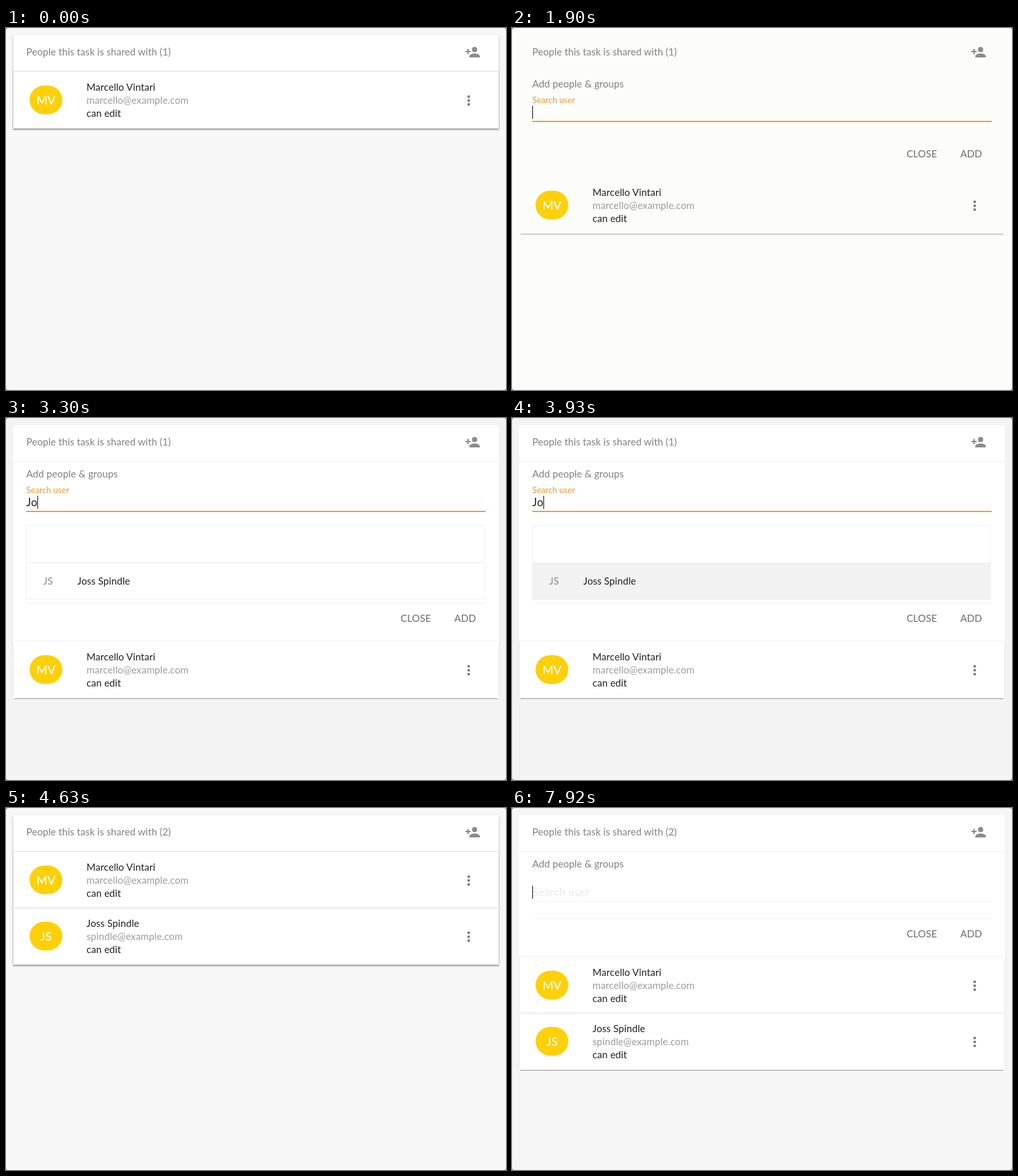
These frames come from a looping animation (764x554 px, 7.99 s). An HTML page:

```html
<!DOCTYPE html>
<html lang="en">
<head>
<meta charset="utf-8">
<title>Task sharing</title>
<style>
html, body { margin: 0; width: 100%; height: 100%; overflow: hidden; background: #555; }
* { box-sizing: border-box; }

.stage {
  --run: 7.99s step-end infinite;
  position: relative; width: 764px; height: 554px; overflow: hidden; border-radius: 3px;
  background: var(--bg); color: #212121;
  font: 15px/20px Lato, Muli, "Open Sans", sans-serif; letter-spacing: .005em; white-space: nowrap;
  animation: tone var(--run);
}
.stage::after { content: ""; position: absolute; inset: 0; border-radius: 3px; box-shadow: inset 0 0 0 1px rgba(0,0,0,.03); }

.card {
  position: absolute; left: 11px; top: 11px; width: 742px; padding-bottom: 1px;
  background: var(--card); box-shadow: var(--shadow);
}
.abs { position: absolute; }
.grey { color: #808080; }

header { position: relative; height: 56px; border-bottom: 1px solid var(--line); }
header .title { left: 20px; top: 15px; }
.count { display: inline-grid; }
.count span { grid-area: 1 / 1; }
.one { animation: one var(--run); }
.two { animation: two var(--run); }
.invite { left: 690px; top: 14px; width: 24px; height: 24px; animation: hover var(--run); }

.panel { position: relative; overflow: hidden; animation: open var(--run); }
.prompt { left: 20px; top: 8px; }
.label {
  left: 20px; top: 52px; font-size: 17px; color: #ebebeb; transform-origin: 0 50%;
  animation: float 7.99s linear infinite;
}
.entry { left: 20px; top: 52px; height: 20px; display: flex; align-items: center; font-size: 17px; letter-spacing: 0; }
.entry span { max-width: 0; overflow: hidden; }
.j { animation: typeJ var(--run); }
.o { animation: typeO var(--run); }
.caret { width: 1px; height: 20px; background: #111; animation: caret var(--run); }
.rule { left: 20px; width: 702px; height: 1px; background: var(--line); }
.base { top: 76px; }
.focus { top: 75px; height: 2px; background: #e9a23b; animation: focus 7.99s linear infinite; }

.results { position: relative; margin: 97px 0 0 20px; width: 701px; height: 0; overflow: hidden; animation: results var(--run); }
.results div { position: relative; height: 56px; border: solid #f0f0f0; border-width: 0 1px 1px; }
.results div:first-child { height: 58px; border-top-width: 1px; }
.results b { position: absolute; left: 25px; top: 17px; font-weight: 400; color: #8a8a8a; }
.results i { position: absolute; left: 77px; top: 17px; font-style: normal; }
.pick { animation: pick var(--run); }

footer { position: relative; height: 64px; }
footer .rule { top: 5px; }
footer .close { left: 592px; top: 18px; color: #6c6c6c; }
footer .add { left: 674px; top: 18px; color: #6c6c6c; }

.row { position: relative; height: 86px; margin: 0 1px; padding: 13px 0 0 111px; box-shadow: 0 0 3px var(--edge); }
.row p { margin: 0; }
.mail { color: #9b9b9b; }
.avatar {
  position: absolute; left: 24px; top: 21px; width: 50px; height: 44px; border-radius: 22px;
  background: #fdd007; color: #fff; font: 500 18px/44px Lato, "Open Sans", sans-serif; text-align: center;
}
.more { position: absolute; left: 683px; top: 32px; width: 24px; height: 24px; fill: #757575; }
.added { animation: added var(--run); }

@keyframes tone {
  0%, 54.443% {
    --bg: #f7f7f7; --card: #fff; --line: #f0f0f0; --edge: rgba(0,0,0,.18);
    --shadow: 0 2px 2px rgba(0,0,0,.2), 0 1px 1px rgba(0,0,0,.2), 0 1px 4px rgba(0,0,0,.12);
  }
  30.788% {
    --bg: #f5f5f5; --card: #fff; --line: #f0f0f0; --edge: rgba(0,0,0,.18);
    --shadow: 0 2px 2px rgba(0,0,0,.2), 0 1px 1px rgba(0,0,0,.2), 0 1px 4px rgba(0,0,0,.12);
  }
  9.762%, 73.717%, 100% {
    --bg: #f5f5f5; --card: #fff; --line: #f0f0f0; --edge: rgba(0,0,0,.14);
    --shadow: 0 3px 0 -2px #a0a0a0;
  }
  18.523% {
    --bg: #fcfcfa; --card: #fcfcfa; --line: transparent; --edge: transparent;
    --shadow: 0 3px 0 -2px #a8a8a8;
  }
  39.549% {
    --bg: #f3f3f3; --card: #fff; --line: #f0f0f0; --edge: rgba(0,0,0,.14);
    --shadow: 0 3px 0 -2px #a0a0a0;
  }
}
@keyframes one { 0% { visibility: visible } 54.443%, 100% { visibility: hidden } }
@keyframes two { 0% { visibility: hidden } 54.443%, 100% { visibility: visible } }
@keyframes hover {
  0%, 15.018%, 81.602%, 100% { fill: #8c8c8c }
  6.257%, 71.088% { fill: #f0c581 }
}
@keyframes open {
  0%, 54.443% { max-height: 0 }
  9.762%, 73.717%, 100% { max-height: 400px }
}
@keyframes float {
  0%, 18.523% { transform: none; color: #ebebeb; animation-timing-function: cubic-bezier(.25,.8,.25,1) }
  23.529% { transform: translateY(-19px) scale(.75); color: #dd9a48 }
  30.788%, 54.443% { transform: translateY(-19px) scale(.75); color: #e29c33; animation-timing-function: step-end }
  54.444%, 100% { transform: none; color: #ebebeb }
}
@keyframes focus {
  0%, 18.523% { transform: scaleX(0); animation-timing-function: cubic-bezier(.25,.8,.25,1) }
  23.529%, 54.443% { transform: none; animation-timing-function: step-end }
  54.444%, 100% { transform: scaleX(0) }
}
@keyframes typeJ { 0%, 54.443%, 100% { max-width: 0 } 30.788% { max-width: 30px } }
@keyframes typeO { 0%, 54.443%, 100% { max-width: 0 } 39.549% { max-width: 30px } }
@keyframes caret { 0%, 54.443% { opacity: 0 } 18.523%, 99.123%, 100% { opacity: 1 } }
@keyframes results {
  0%, 54.443%, 100% { height: 0 }
  32.54% { height: 152px }
  41.301% { height: 114px }
}
@keyframes pick { 0%, 54.443%, 100% { background: transparent } 46.558% { background: #f2f2f2 } }
@keyframes added {
  0% { height: 0; padding-top: 0; overflow: hidden; visibility: hidden }
  54.443%, 100% { height: 86px; padding-top: 13px; overflow: visible; visibility: visible }
}
</style>
</head>
<body>
<div class="stage">
  <div class="card">
    <header>
      <div class="abs title grey">People this task is shared with (<span class="count"><span class="one">1</span><span class="two">2</span></span>)</div>
      <svg class="abs invite" viewBox="0 0 24 24"><path d="M15 12a4 4 0 1 0 0-8 4 4 0 0 0 0 8zM6 10V7H4v3H1v2h3v3h2v-3h3v-2zM15 14c-2.67 0-8 1.34-8 4v2h16v-2c0-2.66-5.33-4-8-4z"/></svg>
    </header>

    <div class="panel">
      <div class="abs prompt grey">Add people &amp; groups</div>
      <div class="abs label">Search user</div>
      <div class="abs entry"><span class="j">J</span><span class="o">o</span><div class="caret"></div></div>
      <div class="abs rule base"></div>
      <div class="abs rule focus"></div>
      <div class="results">
        <div></div>
        <div class="pick"><b>JS</b><i>Joss Spindle</i></div>
        <div><b>JP</b><i>Jasper Plim</i></div>
      </div>
      <footer>
        <div class="abs rule"></div>
        <div class="abs close">CLOSE</div>
        <div class="abs add">ADD</div>
      </footer>
    </div>

    <div class="row">
      <div class="avatar">MV</div>
      <p>Marcello Vintari</p>
      <p class="mail">marcello@example.com</p>
      <p>can edit</p>
      <svg class="more" viewBox="0 0 24 24"><circle cx="12" cy="6" r="2"/><circle cx="12" cy="12" r="2"/><circle cx="12" cy="18" r="2"/></svg>
    </div>
    <div class="row added">
      <div class="avatar">JS</div>
      <p>Joss Spindle</p>
      <p class="mail">spindle@example.com</p>
      <p>can edit</p>
      <svg class="more" viewBox="0 0 24 24"><circle cx="12" cy="6" r="2"/><circle cx="12" cy="12" r="2"/><circle cx="12" cy="18" r="2"/></svg>
    </div>
  </div>
</div>
</body>
</html>
```
